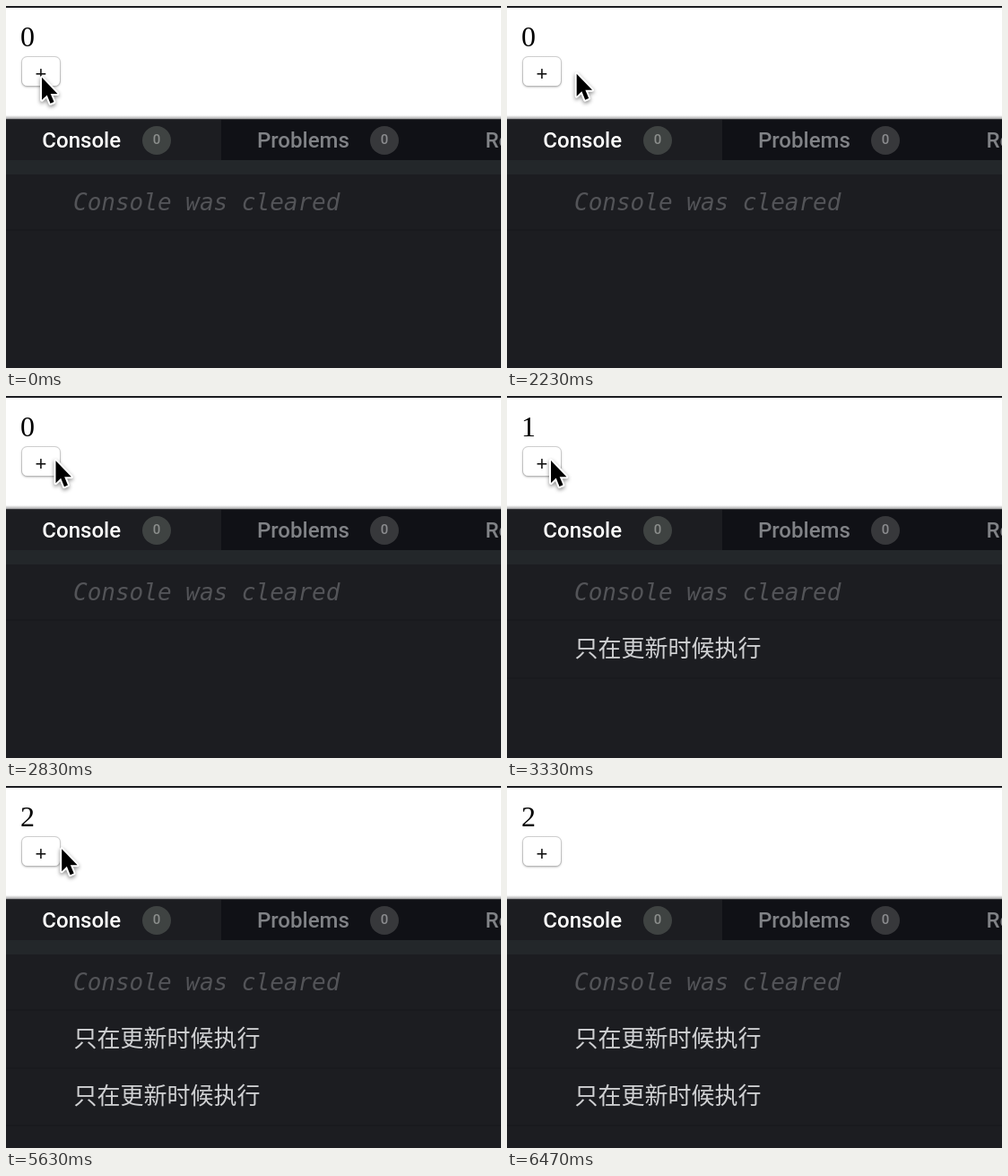
Animation of 552x404 px, one loop 7.23 s. Source, as an HTML page with a canvas:

```html
<!DOCTYPE html>
<html lang="en">
<head>
<meta charset="utf-8">
<title>Counter and console</title>
<style>
  html, body { margin: 0; width: 100%; height: 100%; overflow: hidden; background: #1c1d21; }
  canvas { display: block; }
</style>
</head>
<body>
<canvas id="stage" width="552" height="404"></canvas>
<script>
const ctx = document.getElementById('stage').getContext('2d');
const LOOP = 7230;
const STEPS_PER_MS = 0.03;
const CLICKS = [3200, 4500];
const LOG_DELAY = 30;

const easeIn = power => p => p ** power;
const easeOut = power => p => 1 - (1 - p) ** power;

// The pointer rests between moves; bend lifts the middle of a move.
const HOME = { x: 40, y: 79.8 };
const MOVES = [
  { from: 0, to: 133, x: 41.5, y: 78.8, bend: 0, ease: easeIn(1) },
  { from: 2200, to: 2333, x: 124, y: 74, bend: 1.5, ease: easeOut(2) },
  { from: 2433, to: 3000, x: 49, y: 72, bend: 0, ease: easeOut(2) },
  { from: 5367, to: 5933, x: 220, y: 80, bend: 2.5, ease: easeIn(3.4) },
  { from: 6367, to: 6467, x: 195, y: -60, bend: 0, ease: easeIn(1.7) }
];

function rect(x, y, w, h, fill) {
  ctx.fillStyle = fill;
  ctx.fillRect(x, y, w, h);
}

function text(str, x, y, font, fill, align = 'left') {
  ctx.font = font;
  ctx.fillStyle = fill;
  ctx.textAlign = align;
  ctx.fillText(str, x, y);
}

function vertical(y0, y1, from, to) {
  const g = ctx.createLinearGradient(0, y0, 0, y1);
  g.addColorStop(0, from);
  g.addColorStop(1, to);
  return g;
}

function roundRect(x, y, w, h, r, fill) {
  ctx.beginPath();
  ctx.roundRect(x, y, w, h, r);
  ctx.fillStyle = fill;
  ctx.fill();
}

function setShadow(color, blur, dy) {
  ctx.shadowColor = color;
  ctx.shadowBlur = blur;
  ctx.shadowOffsetY = dy;
}

function drawPage(count) {
  rect(0, 0, 552, 126, '#fff');
  rect(0, 0, 552, 2, '#1b1c20');
  text(count, 16, 45, '32px "Liberation Serif", serif', '#000');

  ctx.save();
  setShadow('rgba(0,0,0,0.2)', 2, 1);
  roundRect(17, 56, 44, 34, 6.5, vertical(56, 90, '#cfcfcf', '#b8b8b8'));
  ctx.restore();
  roundRect(18, 57, 42, 32, 5.5, '#fff');
  text('+', 39, 82.5, '22px "Liberation Sans", sans-serif', '#111', 'center');
}

function drawTab(label, x, ink) {
  text(label, x, 158, '500 24px Roboto, sans-serif', ink);
}

function drawBadge(x, fill, ink) {
  roundRect(x - 16, 134, 32, 32, 16, fill);
  text('0', x, 154, '500 15px Roboto, sans-serif', ink, 'center');
}

function drawConsole(logs) {
  rect(0, 122, 552, 4, vertical(122, 126, '#fff', '#a4a4a5'));
  rect(0, 126, 552, 46, '#101116');
  rect(0, 126, 240, 46, '#1c1d21');
  rect(0, 126, 552, 1, '#3a3b3e');
  drawTab('Console', 40.3, '#fff');
  drawTab('Problems', 280, '#808286');
  drawTab('Re', 534.5, '#808286');
  drawBadge(168, '#3f4342', '#8b8e8c');
  drawBadge(422, '#37383b', '#8b8c8f');

  rect(0, 172, 552, 16, '#23272a');
  rect(0, 188, 552, 216, '#1c1d21');
  rect(0, 249, 552, 2, '#191a1e');
  text('Console was cleared', 75, 228, 'italic 26px "DejaVu Sans Mono", monospace', '#535458');
  for (let i = 0; i < logs; i++) {
    const y = 291 + i * 64;
    text('只在更新时候执行', 75.5, y, '350 26px "Noto Sans CJK SC", "Noto Sans CJK", sans-serif', '#cfd0d2');
    rect(0, y + 23, 552, 2, '#191a1e');
  }
}

function pointerAt(t) {
  let { x, y } = HOME;
  for (const move of MOVES) {
    if (t < move.from) break;
    const p = Math.min(1, (t - move.from) / (move.to - move.from));
    const k = move.ease(p);
    x += (move.x - x) * k;
    y += (move.y - y) * k - move.bend * Math.sin(Math.PI * p);
  }
  return { x, y };
}

function drawPointer({ x, y }) {
  ctx.save();
  ctx.translate(x, y);
  const arrow = new Path2D('M0 0V25L5.7 19.6L9.5 29L13.5 27.3L9.7 18.2H17.4Z');
  ctx.lineJoin = 'round';
  ctx.lineWidth = 4;
  ctx.strokeStyle = '#fff';
  setShadow('rgba(0,0,0,0.45)', 4, 2);
  ctx.stroke(arrow);
  setShadow('transparent', 0, 0);
  ctx.fillStyle = '#000';
  ctx.fill(arrow);
  ctx.restore();
}

function draw(now) {
  const t = now % LOOP;
  // The pointer advances in thirtieths of a second.
  const stepped = Math.floor((t + 4) * STEPS_PER_MS) / STEPS_PER_MS;
  const clicksBy = time => CLICKS.filter(click => time >= click).length;
  drawPage(clicksBy(t));
  drawConsole(clicksBy(t - LOG_DELAY));
  drawPointer(pointerAt(stepped));
}

const start = performance.now();
function tick() {
  draw(performance.now() - start);
  requestAnimationFrame(tick);
}
tick();
</script>
</body>
</html>
```
